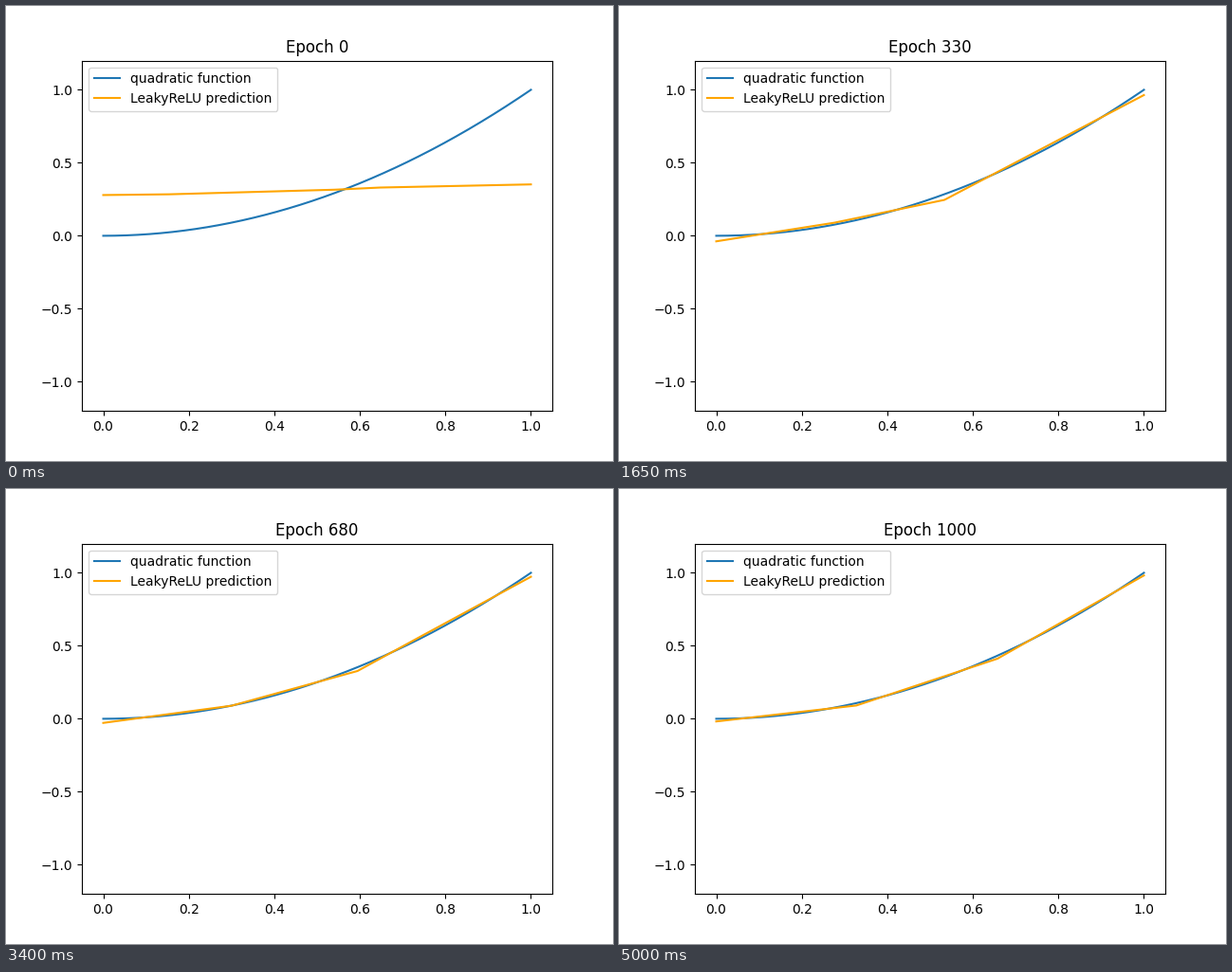
A matplotlib script for the animation above (5.05 s loop, 640 by 480 pixels).

```python
import numpy as np
import matplotlib.pyplot as plt
from matplotlib.animation import FuncAnimation

FRAMES = 101
EPOCHS_PER_FRAME = 10

# Stages of the fit: x and y of its bends
START = np.array([[0, 0.14, 0.53, 0.64, 1],
                  [0.279, 0.283, 0.314, 0.330, 0.352]])
STRAIGHT = np.array([[0, 0.272, 0.533, 0.64, 1],
                     [-0.18, 0.125, 0.36, 0.476, 0.866]])
BENT = np.array([[0, 0.272, 0.533, 0.64, 1],
                 [-0.038, 0.087, 0.245, 0.410, 0.964]])
SETTLED = np.array([[0, 0.327, 0.658, 0.77, 1],
                    [-0.018, 0.090, 0.412, 0.599, 0.982]])


def smooth(step, begin, end):
    t = np.clip((step - begin) / (end - begin), 0, 1)
    return t * t * (3 - 2 * t)


def mix(a, b, t):
    return a + (b - a) * t


def prediction(step):
    """Swing up to a straight line, relax into bends, then let them drift."""
    bends = mix(START, STRAIGHT, smooth(step, 0, 4))
    relax = 1 - np.exp(-max(0, step - 4) / 3.5)
    goal = mix(BENT, SETTLED, smooth(step, 33, 104))
    return np.interp(x, *mix(bends, goal, relax))


x = np.linspace(0, 1, 1000)
fig, ax = plt.subplots(figsize=(6.4, 4.8), dpi=100)
ax.plot(x, x ** 2, color="tab:blue", label="quadratic function")
fit_line, = ax.plot(x, prediction(0), color="orange",
                    label="LeakyReLU prediction")
ax.set_xlim(-0.05, 1.05)
ax.set_ylim(-1.2, 1.2)
ax.legend(loc="upper left")
title = ax.set_title("Epoch 0")


def update(step):
    fit_line.set_ydata(prediction(step))
    title.set_text(f"Epoch {step * EPOCHS_PER_FRAME}")
    return fit_line, title


anim = FuncAnimation(fig, update, frames=FRAMES, interval=50,
                     repeat=True, repeat_delay=0, blit=False)
plt.show()
```
